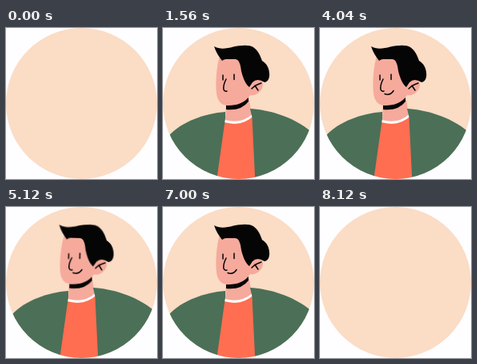
These frames come from a looping animation (189x189 px, 8200 ms). An HTML page:

```html
<!DOCTYPE html>
<html lang="en">
<head>
<meta charset="utf-8">
<title>Portrait</title>
<style>
  html, body { margin: 0; width: 100%; height: 100%; overflow: hidden; background: #fefdff; }
  svg { display: block; width: 100vw; height: 100vh; }
  .person { animation: person 8.2s linear infinite; }
  .head { transform-origin: 94px 110px; animation: head 8.2s ease-in-out infinite; }
  .face { animation: face 8.2s ease-in-out infinite; }
  .smile { stroke-dasharray: 1; animation: smile 8.2s ease-in-out infinite; }
  .line { fill: none; stroke: #050505; stroke-width: 1.5; stroke-linecap: round; stroke-linejoin: round; }

  /* rises into the disc, then drops out */
  @keyframes person {
    0%, .5% { transform: translateY(172px); animation-timing-function: cubic-bezier(.2, .7, .3, 1); }
    11.5%, 87.3% { transform: none; animation-timing-function: cubic-bezier(.42, 0, 1, 1); }
    96%, 100% { transform: translateY(172px); }
  }
  @keyframes head {
    0%, 4% { transform: rotate(4deg); }
    15%, 20.5% { transform: none; }
    27%, 39% { transform: rotate(1.5deg); }
    45%, 54% { transform: none; }
    61%, 73% { transform: rotate(1.7deg); }
    80%, 100% { transform: none; }
  }
  @keyframes face {
    0%, 20.5% { transform: none; }
    27%, 39% { transform: translateX(2px); }
    45%, 54% { transform: none; }
    61%, 73% { transform: translateX(2px); }
    80%, 100% { transform: none; }
  }
  @keyframes smile {
    0%, 20.5% { stroke-dashoffset: 1; opacity: 0; }
    21% { stroke-dashoffset: 1; opacity: 1; }
    26%, 100% { stroke-dashoffset: 0; opacity: 1; }
  }
</style>
</head>
<body>
<svg viewBox="0 0 189 189" aria-hidden="true">
  <defs>
    <clipPath id="disc"><circle cx="94.5" cy="94.5" r="94.5"/></clipPath>
  </defs>
  <g clip-path="url(#disc)">
    <rect width="189" height="189" fill="#fbdcc5"/>
    <g class="person">
      <!-- torso -->
      <path fill="#ff6e51" d="M76 116Q96 126 113 110L120 192H64Z"/>
      <path fill="#f5aa9c" d="M79 90H108L111 109Q97 121 78 116Z"/>
      <path fill="none" stroke="#fff" stroke-width="3" d="M77 116.5Q98 122 112 109.5"/>
      <path fill="#4b7057" d="M78 105C52 107 24 117 8 134L-6 195H66.5L78 113Z"/>
      <path fill="#4b7057" d="M109 101C130 102 162 110 186 130L195 195H115.5L111.5 112Z"/>

      <g class="head">
        <path fill="#050505" d="M79 94L107 87V92Q98 104 79 102Z"/>
        <path fill="#f5aa9c" d="M71 35C67 48 65.5 68 67 82C68 91 73 96.5 80 97C91 97.5 103 94 109 84C117 86 125 78 125 71C125 63 117 61 111 66L102 34Z"/>
        <path fill="#050505" d="M64 23C71 27 79 26 88 23.5C97 21.5 108 20.5 113 24C119 28 122 35 124 41C131 45 134 53 133 61Q132 67 127 68Q118 62 112 68L108 74C102 69 100 61 98 54C97 45 95 39 90 39H80Q77 38.5 74 41C70 36 66 30 64 23Z"/>
        <path class="line" d="M111 76Q116 71 123 69M115 72L119 78"/>
        <g class="face">
          <path class="line" d="M75 59V65M89 58V64.5"/>
          <path class="line" d="M79 64C77 68 75 73 76 77Q77 80 80 79"/>
          <path class="line smile" pathLength="1" d="M81 82.5Q88 85 92 78.5"/>
        </g>
      </g>
    </g>
  </g>
</svg>
</body>
</html>
```
